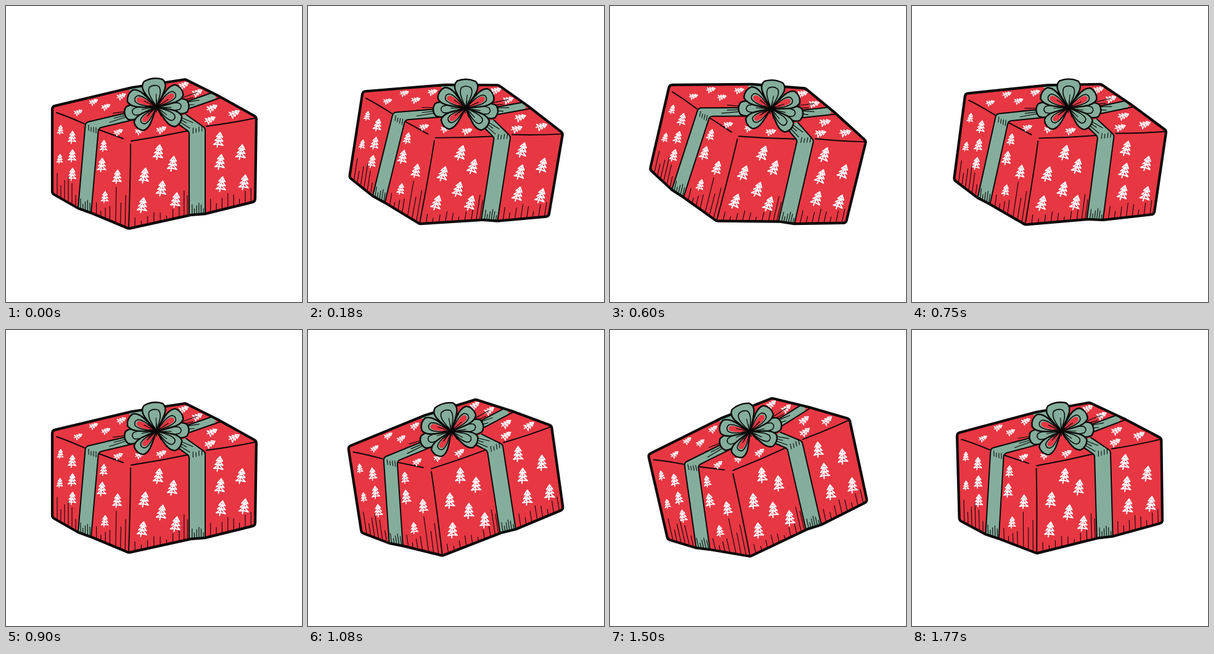
Recreate the animation shown at these times as an HTML page with a canvas. Size 480 px wide and 480 px high, loop 1.8 s.

```html
<!DOCTYPE html>
<html lang="en">
<head>
<meta charset="utf-8">
<title>Gift box</title>
<style>
html, body { margin: 0; width: 100%; height: 100%; overflow: hidden; background: #fff; }
canvas { display: block; width: 480px; height: 480px; }
</style>
</head>
<body>
<canvas id="stage"></canvas>
<script>
const LOOP = 1800, STEP = 30, SWING = 15;
const RED = '#e73743', GREEN = '#84ae9b', INK = '#080808';
const KNOT = [244, 164];
const canvas = document.getElementById('stage');
const ctx = canvas.getContext('2d');
const dpr = window.devicePixelRatio || 1;
canvas.width = canvas.height = 480 * dpr;

function fill(path, color) {
  ctx.fillStyle = color;
  ctx.fill(path);
}

function line(path, width = 1.6, color = INK) {
  ctx.strokeStyle = color;
  ctx.lineWidth = width;
  ctx.stroke(path);
}

const curve = (d, width) => line(new Path2D(d), width);

function at(x, y, deg, size, draw) {
  ctx.save();
  ctx.translate(x, y);
  ctx.rotate(deg * Math.PI / 180);
  ctx.scale(size, size);
  draw();
  ctx.restore();
}

// Polyline with rounded inner corners
function bend(points, r) {
  const path = new Path2D();
  path.moveTo(...points[0]);
  for (let i = 1; i < points.length - 1; i++) path.arcTo(...points[i], ...points[i + 1], r);
  path.lineTo(...points[points.length - 1]);
  return path;
}

const box = bend([[75, 235], [75, 163], [205, 132], [291, 119], [345, 146], [406, 180],
  [404, 317], [323, 337], [299, 339], [199, 361], [139, 336], [117, 328], [75, 304], [75, 235]], 6);
box.closePath();

// A band is one edge swept along a vector
function ribbon(edge, dx, dy) {
  const other = edge.map(([x, y]) => [x + dx, y + dy]);
  const band = bend(edge, 7);
  const far = bend(other, 7);
  const area = new Path2D(band);
  const back = [...other].reverse();
  area.lineTo(...back[0]);
  area.addPath(far);
  const body = bend([...edge, ...back], 5);
  body.closePath();
  fill(body, GREEN);
  line(band, 2);
  line(far, 2);
}

// Three stacked arrowheads on a trunk
const tree = new Path2D('M1 -12L-1 12');
for (let i = 0; i < 3; i++) {
  const y = -12 + 6.5 * i, w = 4.5 + 1.3 * i;
  tree.addPath(new Path2D(`M${-w} ${y + 7.5}L0.5 ${y}L${w + 1} ${y + 7}L0 ${y + 6}Z`));
}

// n by m trees spaced by two vectors
function trees(x, y, [ax, ay, n], [bx, by, m], deg, size) {
  for (let i = 0; i < n; i++)
    for (let j = 0; j < m; j++) {
      const px = x + ax * i + bx * j, py = y + ay * i + by * j;
      at(px, py, deg, size || .5 + px / 1400, () => line(tree, 2, '#fff'));
    }
}

const ONE = [0, 0, 1];

function drawTrees() {
  trees(247, 237, [23, 19, 2], [5, 59, 2], 8, 1);
  trees(224, 275, ONE, [-3, 48, 2], 8, 1);
  trees(345, 217, ONE, [2, 36, 3], 8, 1);
  trees(381, 237, ONE, [5, 49, 2], 8, 1);
  trees(88, 201, ONE, [-1, 47, 2], 3, .62);
  trees(107, 213, ONE, [0, 30, 3], 3, .82);
  trees(158, 227, ONE, [2, 83, 2], 3, .75);
  trees(155, 258, [25, 19, 2], ONE, 3, .9);
  // Lid trees lie flat and grow towards the right
  trees(142, 155, [45, -9, 2], [-25, 17, 2], 62);
  trees(288, 128, [22, 12, 2], ONE, 62);
  trees(182, 204, [35, -2, 3], ONE, 62);
  trees(334, 165, [36, 9, 2], ONE, 62);
  trees(331, 184, ONE, ONE, 62);
}

// Strokes of uneven height rising from a sloped edge
function hatch(x0, y0, x1, y1, count, low, high, lean = 0) {
  for (let i = 0; i < count; i++) {
    const k = (i + .5) / count;
    const x = x0 + (x1 - x0) * k, y = y0 + (y1 - y0) * k;
    const h = low + (high - low) * Math.abs(Math.sin(i * 2.3 + 1));
    curve(`M${x} ${y}L${x + lean} ${y - h}`, 1.1);
  }
}

// Folds running out from the knot
function fan(deg, spread, count, near, far) {
  for (let i = 0; i < count; i++) {
    const turn = deg + spread * (i / (count - 1) - .5);
    at(...KNOT, turn, 1, () => curve(`M${near} 0L${far - 9 * (i % 2)} 0`, 1.2));
  }
}

function loop(len, w) {
  return new Path2D(`M0 0C${len * .45} ${-w * .7} ${len * .72} ${-w * 1.25} ${len * .93} ${-w * .75}` +
    `Q${len * 1.06} 0 ${len * .93} ${w * .75}C${len * .72} ${w * 1.25} ${len * .45} ${w * .7} 0 0Z`);
}

function petal(deg, len, w, hole) {
  at(...KNOT, deg, 1, () => {
    fill(loop(len, w), GREEN);
    line(loop(len, w), 2.4);
    const inner = loop(len * .76, w * .5);
    if (hole) fill(loop(len * .7, w * .36), RED);
    line(inner, 1.6);
    curve(`M0 0L${len * .45} ${w * .1}`, 1.2);
  });
}

// Loops in mirrored pairs around a slightly tilted axis
function drawBow() {
  const axis = -97;
  for (const side of [-1, 1]) {
    petal(axis + side * 95, 53, 13);
    petal(axis + side * 130, 46, 13, side < 0);
    petal(axis + side * 60, 50, 14, true);
  }
  petal(axis, 47, 20);
  for (let i = 0; i < 14; i++)
    at(...KNOT, i * 26 + 10, 1, () => curve(`M0 0L${8 + 4 * (i % 3)} 0`, 1.4));
}

function drawBox() {
  fill(box, RED);

  curve('M82 173Q100 179 127 191M149 200L190 215M202 224Q202 270 199 358', 1.9);
  curve('M203 219Q250 212 297 202M325 195Q365 190 403 182', 1.9);
  drawTrees();

  hatch(80, 304, 116, 324, 6, 14, 38);
  hatch(143, 337, 172, 348, 4, 6, 22);
  hatch(174, 349, 197, 359, 3, 30, 62, 1);
  hatch(204, 359, 286, 340, 8, 5, 16);
  hatch(286, 340, 297, 337, 2, 28, 42);
  hatch(327, 334, 402, 316, 8, 8, 22);

  ctx.save();
  ctx.clip(box);
  ribbon([[284, 158], [333, 141]], 14, 8);
  ribbon([[197, 135], [220, 128]], 19, 10);
  ribbon([[205, 171], [129, 189], [116, 338]], 21, 9);
  ribbon([[266, 182], [297, 204], [297, 350]], 26, -6);
  ctx.restore();

  hatch(119, 327, 138, 334, 5, 6, 17);
  hatch(300, 337, 322, 335, 6, 6, 16);
  hatch(132, 201, 148, 207, 4, 6, 9);
  hatch(301, 207, 320, 202, 4, 6, 9);
  fan(167, 10, 4, 38, 80);
  fan(30, 14, 4, 34, 64);
  fan(-12, 16, 4, 46, 70);

  line(box, 4.2);
  drawBow();
}

function frame(now) {
  const t = Math.floor((now % LOOP) / STEP) * STEP;
  const deg = SWING * Math.sin(2 * Math.PI * t / LOOP);
  ctx.setTransform(dpr, 0, 0, dpr, 0, 0);
  ctx.fillStyle = '#fff';
  ctx.fillRect(0, 0, 480, 480);
  ctx.lineCap = ctx.lineJoin = 'round';
  at(240, 240, deg, 1, () => {
    ctx.translate(-240, -240);
    drawBox();
  });
}

let start = null;
function tick(now) {
  if (start === null) start = now;
  frame(Math.max(0, now - start));
  requestAnimationFrame(tick);
}
frame(0);
requestAnimationFrame(tick);
</script>
</body>
</html>
```
